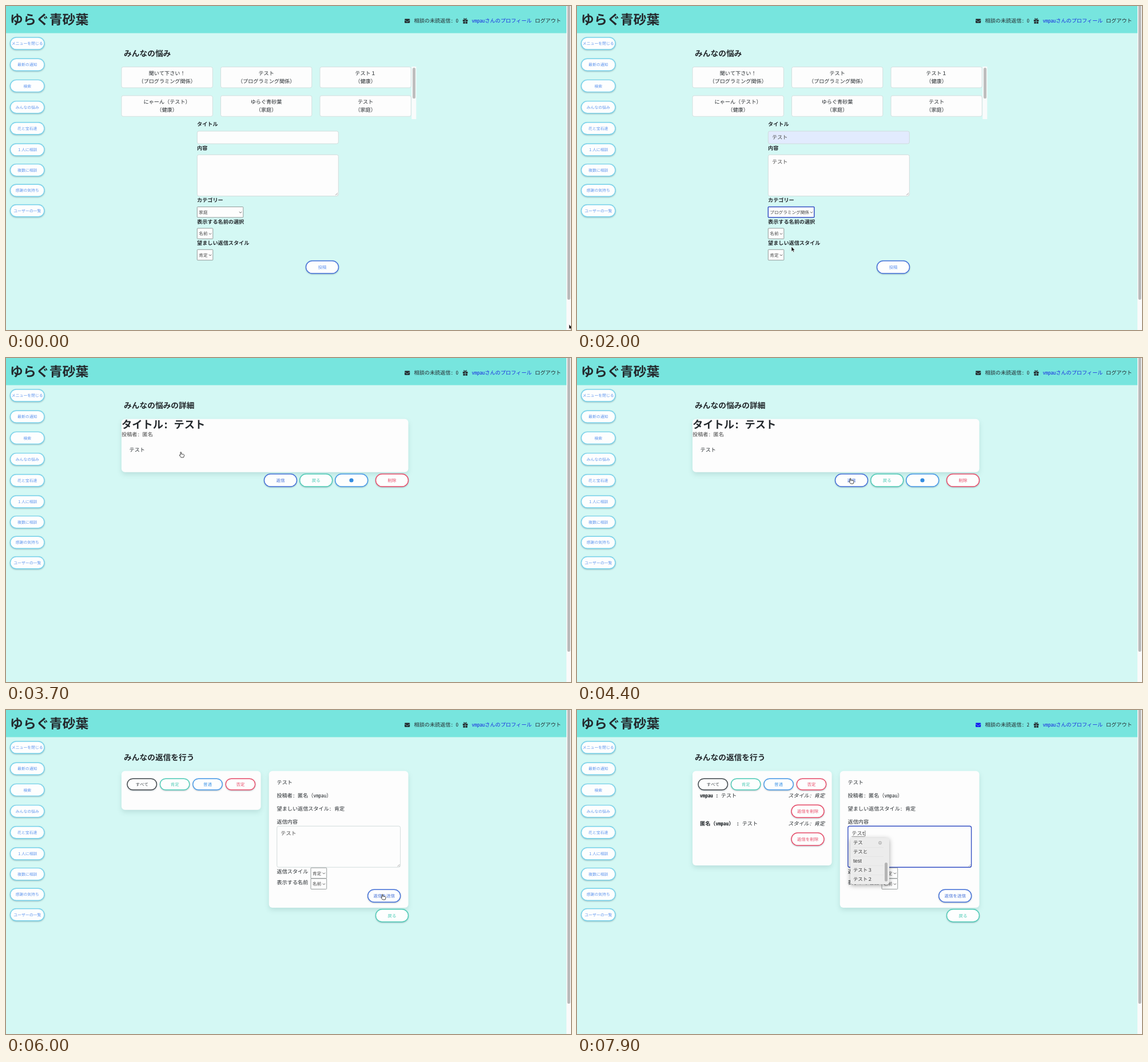
An HTML page for the animation above (8 s loop, 988 by 567 pixels).

```html
<!DOCTYPE html>
<html lang="ja">
<head>
<meta charset="utf-8">
<title>みんなの悩み</title>
<style>
html, body { margin: 0; width: 100%; height: 100%; overflow: hidden; background: #d4f8f4; }
svg { display: block; width: 988px; height: 567px; }
text { font-family: "Noto Sans Mono CJK JP", "Noto Sans CJK JP", "Noto Sans CJK", monospace;
  text-rendering: geometricPrecision; white-space: pre; }
.pill { filter: drop-shadow(0 1px 1px rgba(0, 40, 60, .28)); }
.card { filter: drop-shadow(0 4px 4px rgba(0, 60, 60, .12)); }
.menu { filter: drop-shadow(0 2px 4px rgba(0, 0, 0, .35)); }
</style>
</head>
<body>
<svg id="stage" viewBox="0 0 988 567"></svg>
<script>
const LOOP = 8000, TICK = 100;
const SITE = 'ゆらぐ青砂葉', USER = 'vmpau';
const INK = '#24292d', BLUE = '#4370d9', SKY = '#4598e8', GREEN = '#4fccb7', RED = '#e94b68', FOCUS = '#3550c4';
const stage = document.getElementById('stage');

// Latest value whose start time has passed.
const at = (t, steps) => steps.reduce((value, [start, next]) => t >= start ? next : value, steps[0][1]);
const within = (t, from, to) => t >= from && t < to;

const rect = (x, y, w, h, fill, extra = '') =>
  `<rect x="${x}" y="${y}" width="${w}" height="${h}" fill="${fill}" ${extra}/>`;

// Text placed by the vertical centre of its characters.
const text = (str, x, cy, size = 9.15, fill = INK, extra = '') =>
  `<text x="${x}" y="${cy + size * .38}" font-size="${size}" fill="${fill}" ${extra}>${str}</text>`;
const bold = (str, x, cy, size = 9.15) => text(str, x, cy, size, INK, 'font-weight="700"');
const centred = (str, x, cy, size, fill) => text(str, x, cy, size, fill, 'text-anchor="middle"');

const pill = (label, x, cy, color, w = 57, h = 22, size = 7.5, ink = color) =>
  rect(x, cy - h / 2, w, h, '#fdfefe', `rx="${h / 2}" stroke="${color}" stroke-width="1.4" class="pill"`) +
  centred(label, x + w / 2, cy, size, ink);

const card = (x, y, w, h) => rect(x, y, w, h, '#fdfdfd', 'rx="6" class="card"');

const select = (label, x, y, w, focused) =>
  rect(x, y, w, 18.5, '#fdfdfd', `rx="1" stroke="${focused ? FOCUS : '#7d8383'}" stroke-width="${focused ? 1.5 : .8}"`) +
  text(label, x + 3, y + 9.5, 7.63, '#444') +
  `<path d="M${x + w - 7} ${y + 8.5}l2.2 2.2 2.2-2.2" fill="none" stroke="#555" stroke-width=".9"/>`;

const field = (x, y, w, h, focused, fill = '#fdfdfd') =>
  rect(x, y, w, h, fill, `rx="3" stroke="${focused ? FOCUS : '#cfd8d9'}" stroke-width="${focused ? 1.4 : .9}"`);

const grip = (x, y) => `<path d="M${x - 5} ${y - 1}l4-4M${x - 2.5} ${y - 1}l1.5-1.5" stroke="#888" stroke-width=".7"/>`;

function typed(str, x, cy, caret, composing) {
  const width = [...str].reduce((sum, ch) => sum + (ch < '~' ? 4.58 : 9.15), 0);
  return text(str, x, cy, 9.15, '#444') +
    (composing && str ? rect(x, cy + 5, width, .7, '#777') : '') +
    (caret ? rect(x + width + .3, cy - 5, .7, 10, '#333') : '');
}

function dropdown(options, x, y, w, chosen) {
  return rect(x, y, w, options.length * 13 + 6, '#eeeeee', 'rx="4" class="menu"') +
    options.map((label, i) => (i === chosen ? rect(x + 2, y + 3 + i * 13, w - 4, 13, '#3b7ff0', 'rx="3"') : '') +
      text(label, x + 10, y + 9.5 + i * 13, 7.63, i === chosen ? '#fff' : '#333')).join('');
}

function candidates(words, w, thumbY, thumbH, info) {
  const rows = words.map((word, i) => {
    const cy = 232 + i * 16;
    const font = word === 'test' ? 'style="font-family:\'Liberation Sans\',sans-serif"' : '';
    return text(word, 483, cy, font ? 9.2 : 8.4, '#333', font) + rect(483, cy + 8, w - 15, .5, '#dcdcdc');
  }).join('');
  return rect(478, 224, w, 81, '#ececec', 'rx="4" class="menu"') + rows +
    rect(470 + w, thumbY, 5, thumbH, '#b4b4b4', 'rx="2.5"') +
    (info ? '<circle cx="530" cy="232.500" r="2.500" fill="none" stroke="#777" stroke-width=".6"/>' +
      rect(529.7, 231.3, .6, 2.6, '#777') : '');
}

function frame(unread) {
  const menu = ['メニューを閉じる', '最新の通知', '検索', 'みんなの悩み', '花と宝石達', '１人に相談', '複数に相談', '感謝の気持ち', 'ユーザーの一覧'];
  const mail = unread ? '#1414f0' : INK;
  return rect(0, 0, 988, 567, '#d4f8f4') + rect(0, 0, 980, 47.5, '#77e5de') +
    rect(980, 0, 8, 567, '#fafafa') + rect(981.6, -4, 5, 518, '#b9b9b9', 'rx="2.5"') +
    bold(SITE, 7, 23.5, 22.9) +
    rect(697, 22.5, 9.2, 7.2, mail, 'rx="1"') +
    '<path d="M697 24.500l4.600 3.200 4.600-3.200" fill="none" stroke="#77e5de" stroke-width=".8"/>' +
    text(`相談の未読返信: ${unread}`, 713.5, 26) +
    rect(798.8, 24, 8.6, 2.8, INK) + rect(799.4, 27.4, 7.4, 3.4, INK) + rect(802.7, 24, .8, 7, '#77e5de') +
    `<path d="M803 24c-4-1-3-4 0-1c3-3 4 0 0 1" fill="none" stroke="${INK}"/>` +
    text(`${USER}さんのプロフィール`, 814.5, 26, 9.15, '#1a2ee0') + text('ログアウト', 925, 26) +
    menu.map((label, i) => pill(label, 7.5, 65.5 + i * 37.2 - Math.max(0, i - 5) * 1.6, '#78d3ec', 59.5, 21, 6.86, '#5f95ee')).join('');
}

function listPage(t) {
  const posted = t >= 2800;
  const scroll = t < 3000 ? 0 : Math.min(1, (t - 3000) / 300);
  const posts = [['聞いて下さい！', 'プログラミング関係'], ['テスト', 'プログラミング関係'], ['テスト１', '健康'],
    ['にゃーん（テスト）', '健康'], [SITE, '家庭'], ['テスト', '家庭'], ['テスト', 'プログラミング関係']];
  const cards = posts.map(([title, kind], i) => {
    const x = 202 + i % 3 * 173.5, y = 106.7 + Math.floor(i / 3) * 50.2 - scroll * 65;
    return rect(x, y, 159.3, 36.3, '#fdfdfd', 'rx="3" stroke="#d2dcdc" stroke-width=".9"') +
      centred(title, x + 79.6, y + 11, 9.15, INK) + centred(`（${kind}）`, x + 79.6, y + 25, 9.15, INK);
  }).join('');
  const title = posted ? '' : at(t, [[0, ''], [500, 'て'], [600, 'てす'], [700, 'テスト']]);
  const body = posted ? '' : at(t, [[0, ''], [1000, 'て'], [1100, 'てす'], [1200, 'テスト']]);
  const category = !posted && t >= 1800 ? 'プログラミング関係' : '家庭';
  const name = !posted && t >= 2400 ? '匿名' : '名前';
  const onTitle = within(t, 400, 900), onBody = within(t, 900, 1500);
  return bold('みんなの悩み', 206, 83, 13.73) +
    '<clipPath id="list"><rect x="200" y="106" width="509" height="92"/></clipPath>' +
    `<g clip-path="url(#list)">${cards}</g>` +
    rect(709.3, 106, 8, 92, '#f9fbfb') + rect(711, 108 + scroll * 35, 5, 54, '#bebebe', 'rx="2.5"') +
    bold('タイトル', 334, 207) + field(334.3, 219, 247, 22, onTitle, title === 'テスト' ? '#e2ebfe' : '#fdfdfd') +
    typed(title, 341, 230, onTitle, onTitle && t < 700) +
    bold('内容', 334, 248.3) + field(334.3, 260.3, 247, 72.3, onBody) + grip(581, 332) +
    typed(body, 341, 273, onBody, onBody && t < 1300) +
    bold('カテゴリー', 334, 340) + select(category, 334.3, 351.5, 80.5, within(t, 1500, 2200)) +
    bold('表示する名前の選択', 334, 377.5) + select(name, 334.3, 389, 27.5, within(t, 2200, 2800)) +
    bold('望ましい返信スタイル', 334, 414.5) + select('肯定', 334.3, 426.3, 27.5) +
    pill('投稿', 524.5, 457, BLUE, 57, 22, 7.5, '#6294f0') +
    (within(t, 1500, 1800) ? dropdown(['家庭', '健康', 'プログラミング関係'], 328, 352, 96, at(t, [[0, 0], [1600, 1], [1700, 2]])) : '') +
    (within(t, 2200, 2400) ? dropdown(['名前', '匿名'], 328, 388, 44, t < 2300 ? 0 : 1) : '');
}

function detailPage() {
  return bold('みんなの悩みの詳細', 206, 83, 13.73) + card(202, 106.8, 501.5, 93) +
    bold('タイトル: テスト', 202, 116.5, 18.3) + text('投稿者: 匿名', 202, 133.8, 9.15, '#444') +
    text('テスト', 215.5, 161) +
    pill('返信', 451.5, 214, BLUE) + pill('戻る', 513.7, 214, GREEN) + pill('', 575.7, 214, SKY) +
    '<circle cx="604" cy="214" r="3.600" fill="#338ce0"/>' + pill('削除', 646.5, 214, RED);
}

function replyPage(t, replies) {
  const draft = at(t, [[0, ''], [5300, 'て'], [5400, 'てs'], [5500, 'テスト'], [6100, ''], [6500, 'て'], [6600, 'てす'],
    [6700, 'テスト'], [7500, ''], [7700, 'て'], [7800, 'テス'], [7900, 'テスt']]);
  const writing = within(t, 4900, 5800) || within(t, 6300, 7000) || t >= 7600;
  const composing = within(t, 5300, 5700) || within(t, 6500, 6900) || t >= 7700;
  const caret = writing && !within(t, 6700, 6900);
  const name = within(t, 7200, 7500) ? '匿名' : '名前';
  const reply = (author, i) => bold(`${author} : `, 215, 150 + i * 48.7) +
    text('テスト', i ? 288.7 : 251.8, 150 + i * 48.7) +
    text('スタイル: 肯定', 433, 150 + i * 48.7, 9.15, INK, 'font-style="italic" text-anchor="end"') +
    pill('返信を削除', 375, 177.3 + i * 48.7, RED);
  const filters = [['すべて', '#41474b'], ['肯定', GREEN], ['普通', SKY], ['否定', RED]];
  return bold('みんなの返信を行う', 206, 83, 13.73) +
    card(202, 106.8, 243.6, 68 + replies * 48.6) + card(459.8, 106.8, 243.7, 239.2) +
    filters.map(([label, color], i) => pill(label, 212 + i * 57.4, 130, color, 51.5, 19.5)).join('') +
    [USER, `匿名（${USER}）`].slice(0, replies).map(reply).join('') +
    ['テスト', `投稿者: 匿名（${USER}）`, '望ましい返信スタイル: 肯定', '返信内容'].map((s, i) => text(s, 473.5, 127 + i * 23)).join('') +
    field(473.8, 203.2, 215.8, 72, writing) + grip(689.5, 275) + typed(draft, 480.3, 216, caret, composing) +
    text('返信スタイル', 473.5, 283) + select('肯定', 533, 276.2, 27.7) +
    text('表示する名前', 473.5, 302) + select(name, 533, 295, 27.7, within(t, 7000, 7400)) +
    pill('返信を送信', 632.7, 325.3, BLUE) + pill('戻る', 646.5, 359.7, GREEN) +
    (within(t, 5500, 5600) || within(t, 6700, 6900) ? candidates(['test', 'テスと', 'テストですか'], 77, 262, 29) : '') +
    (t >= 7900 ? candidates(['テス', 'テスと', 'test', 'テスト３', 'テスト２'], 68, 267, 33, true) : '') +
    (within(t, 7000, 7200) ? dropdown(['名前', '匿名'], 527, 294, 44, t < 7100 ? 0 : 1) : '');
}

const POINTERS = {
  arrow: '<path d="M0 0V8.500L2 6.800 3.400 9.800 4.800 9.200 3.500 6.300H6Z" fill="#111" stroke="#fff" stroke-width=".6"/>',
  beam: '<path d="M-2-4.500Q0-4.500 0-3Q0-4.500 2-4.500M0-3V3M-2 4.500Q0 4.500 0 3Q0 4.500 2 4.500" fill="none" stroke="#333" stroke-width=".9"/>',
  hand: '<path d="M-2.500 1V-4Q-1.800-5.200-1-4V-1L3-.5Q4.500 0 4 2L3 5H-1.500L-4.300 1Q-4 0-2.500 1Z" fill="#fff" stroke="#333" stroke-width=".9"/>',
  none: ''
};

// Time, position and pointer shape from that time on.
const PATH = [[0, 984.5, 557, 'arrow'], [400, 450, 230, 'beam'], [500, 450, 230, 'none'], [700, 430, 250, 'beam'],
  [800, 407, 292, 'beam'], [1000, 407, 292, 'none'], [1300, 400, 310, 'arrow'], [1500, 375, 361, 'arrow'],
  [1700, 375, 388, 'arrow'], [1800, 375, 388, 'arrow'], [2000, 375, 421, 'arrow'], [2200, 350, 398, 'arrow'],
  [2300, 350, 410, 'arrow'], [2400, 350, 410, 'arrow'], [2700, 553, 459, 'hand'], [2900, 553, 459, 'arrow'],
  [3200, 307.5, 169, 'hand'], [3700, 307.5, 169, 'hand'], [3800, 350, 181, 'arrow'], [4200, 480, 215, 'hand'],
  [4500, 480, 215, 'arrow'], [4800, 560, 235, 'beam'], [5000, 560, 235, 'none'], [5600, 560, 235, 'arrow'],
  [5900, 660, 327, 'hand'], [6100, 660, 327, 'arrow'], [6300, 560, 235, 'beam'], [6500, 560, 235, 'none'],
  [6700, 550, 224, 'arrow'], [6800, 550, 224, 'arrow'], [7000, 547, 304, 'arrow'], [7100, 547, 316, 'arrow'],
  [7200, 547, 316, 'arrow'], [7400, 660, 327, 'hand'], [7500, 660, 327, 'arrow'], [7600, 560, 235, 'beam'],
  [7700, 560, 235, 'none']];

function pointer(t) {
  const i = PATH.findLastIndex(([time]) => time <= t);
  const [t0, x0, y0, shape] = PATH[i], [t1, x1, y1] = PATH[i + 1] || [LOOP, x0, y0];
  const u = (t - t0) / (t1 - t0), k = u * u * (3 - 2 * u);
  return `<g transform="translate(${x0 + (x1 - x0) * k} ${y0 + (y1 - y0) * k})">${POINTERS[shape]}</g>`;
}

function render(t) {
  const replies = at(t, [[0, 0], [6100, 1], [7500, 2]]);
  const page = t < 3600 ? listPage(t) : t < 4500 ? detailPage() : replyPage(t, replies);
  stage.innerHTML = frame(replies) + page + pointer(t);
}

const start = performance.now();
let shown = -1;
function loop() {
  const t = Math.floor((performance.now() - start) % LOOP / TICK) * TICK;
  if (t !== shown) render(shown = t);
  requestAnimationFrame(loop);
}
loop();
</script>
</body>
</html>
```
